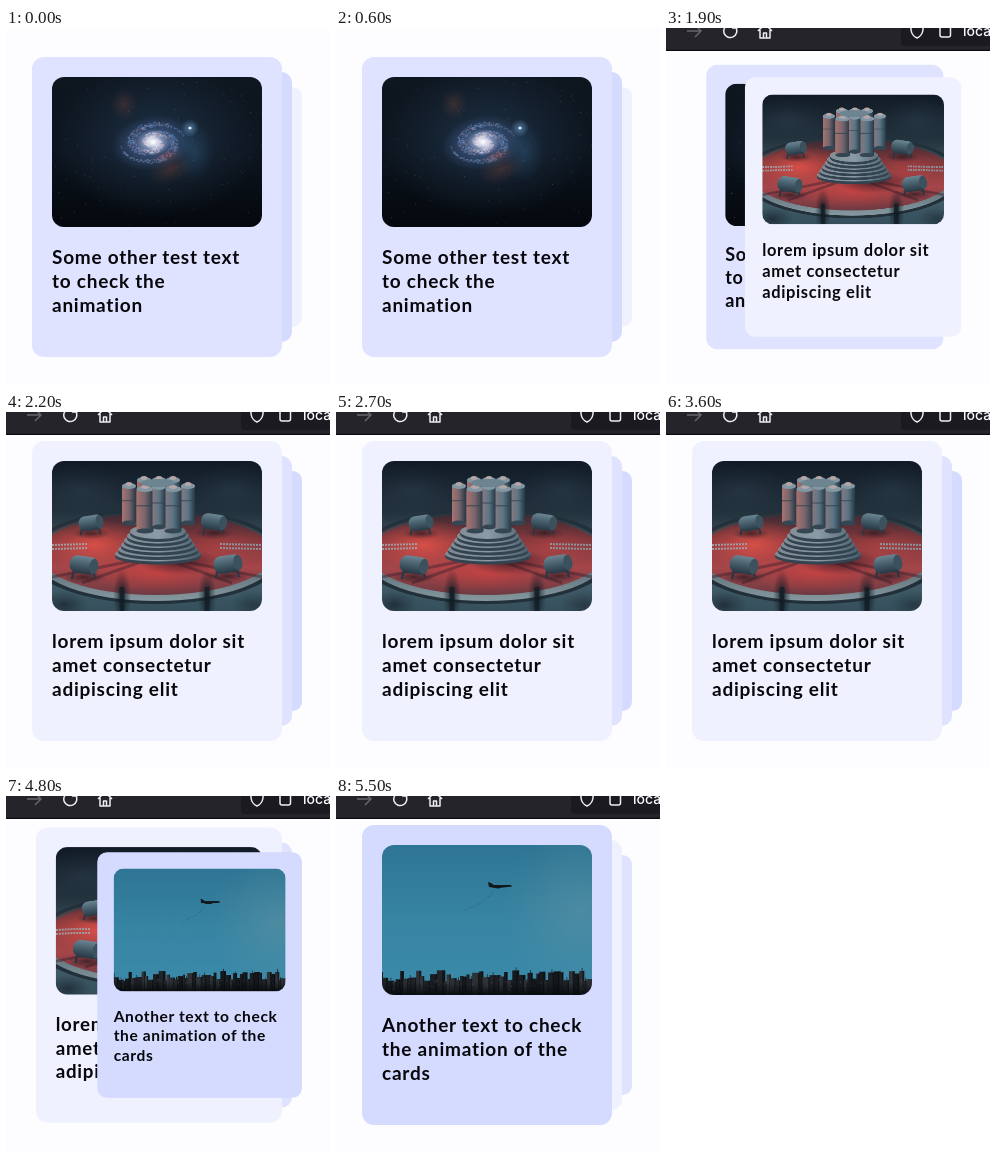
These frames come from a looping animation (324x356 px, 5600 ms). An HTML page with a canvas:

```html
<!DOCTYPE html>
<html lang="en">
<head>
<meta charset="utf-8">
<title>Card stack</title>
<style>
  html, body { margin: 0; width: 100%; height: 100%; overflow: hidden; background: #fdfdff; }
  .card {
    position: absolute; left: 26px; top: 29px; width: 250px; height: 300px;
    border-radius: 12px; transform-origin: 100% 50%;
  }
  .card canvas { position: absolute; left: 20px; top: 20px; width: 210px; height: 150px; border-radius: 12px; }
  .card p {
    position: absolute; left: 20px; top: 188px; margin: 0; white-space: nowrap;
    font: 700 19px/24px Lato, sans-serif; letter-spacing: .75px; color: #08080c;
  }
  #bar { position: absolute; left: 0; top: 0; z-index: 9; display: block; }
</style>
</head>
<body>
<div class="card" style="background:#e0e3ff"><canvas></canvas><p>Some other test text<br>to check the<br>animation</p></div>
<div class="card" style="background:#d5daff"><canvas></canvas><p>Another text to check<br>the animation of the<br>cards</p></div>
<div class="card" style="background:#f0f1ff"><canvas></canvas><p>lorem ipsum dolor sit<br>amet consectetur<br>adipiscing elit</p></div>
<svg id="bar" width="324" height="23" fill="none" stroke="#eeeef2" stroke-width="1.5" stroke-linejoin="round">
  <path d="M0 0H324V23H0Z" fill="#25242b" stroke="none"/>
  <path d="M0 22.5H324" stroke="#0c0c10"/>
  <path d="M235 0V14Q235 18 239 18H324V0Z" fill="#1b1a21" stroke="none"/>
  <path d="M21 3H35M29-3L35 3L29 9" stroke="#66656d"/>
  <path d="M70 0A6.5 6.5 0 1 1 62-3M66 0H71V-5"/>
  <path d="M92 3L99-4L106 3M94 2V10H104V2M97.5 10V5H100.5V10"/>
  <path d="M245-3V2Q246 8 251 10Q256 8 257 2V-3"/>
  <rect x="274" y="-6" width="10.5" height="15" rx="2"/>
  <text x="297" y="8" fill="#fbfbfe" stroke="none" font-family="Inter, sans-serif" font-size="14" font-weight="500">loca</text>
</svg>
<script>
const LOOP = 5600, SWAPS = [1748, 4725];
const TAU = Math.PI * 2;
const cards = [...document.querySelectorAll('.card')];
const bar = document.getElementById('bar');

function seeded(seed) {
  return () => (seed = (seed * 16807) % 2147483647) / 2147483647;
}

function painter(card) {
  const canvas = card.querySelector('canvas');
  canvas.width = 420;
  canvas.height = 300;
  const c = canvas.getContext('2d');
  c.scale(2, 2);
  const rect = (x, y, w, h, fill) => { c.fillStyle = fill; c.fillRect(x, y, w, h); };
  const oval = (x, y, rx, ry, fill) => {
    c.fillStyle = fill;
    c.beginPath();
    c.ellipse(x, y, rx, ry, 0, 0, TAU);
    c.fill();
  };
  const line = (width, color, ...pts) => {
    c.lineWidth = width;
    c.strokeStyle = color;
    c.beginPath();
    for (let i = 0; i < pts.length; i += 2) c.lineTo(pts[i], pts[i + 1]);
    c.stroke();
  };
  const fade = (x0, y0, x1, y1, ...colors) => {
    const g = c.createLinearGradient(x0, y0, x1, y1);
    colors.forEach((color, i) => g.addColorStop(i / (colors.length - 1), color));
    return g;
  };
  // Soft elliptical glow of an "r,g,b" colour
  const glow = (x, y, rx, ry, rgb, alpha, turn = 0) => {
    c.save();
    c.translate(x, y);
    c.rotate(turn);
    c.scale(rx, ry);
    const g = c.createRadialGradient(0, 0, 0, 0, 0, 1);
    g.addColorStop(0, `rgba(${rgb},${alpha})`);
    g.addColorStop(.5, `rgba(${rgb},${alpha * .45})`);
    g.addColorStop(1, `rgba(${rgb},0)`);
    oval(0, 0, 1, 1, g);
    c.restore();
  };
  return { c, rect, oval, line, fade, glow };
}

function paintGalaxy({ c, rect, oval, fade, glow }) {
  const rnd = seeded(71);
  rect(0, 0, 210, 150, fade(0, 0, 0, 150, '#0e161f', '#0d151f', '#05080d'));
  glow(105, 62, 105, 80, '38,62,88', .7);
  glow(72, 27, 14, 16, '110,66,56', .4);
  glow(119, 92, 24, 14, '120,66,54', .4, -.4);
  glow(142, 74, 20, 30, '48,92,125', .45);
  for (let i = 0; i < 110; i++) {
    oval(rnd() * 210, rnd() * 150, .35, .35, `rgba(205,218,235,${.1 + rnd() * .5})`);
  }
  glow(101, 66, 42, 27, '92,126,190', .75, -.15);
  c.save();
  c.translate(101, 66);
  c.rotate(-.12);
  for (let i = 0; i < 1100; i++) {
    const k = rnd(), r = 5 + 27 * k;
    const a = k * 5.5 + (i % 2) * Math.PI + (rnd() - .5) * 1.8;
    const rgb = rnd() < .2 ? '180,110,110' : k < .4 ? '205,205,230' : '120,155,210';
    oval(Math.cos(a) * r, Math.sin(a) * r * .65, .8, .6, `rgba(${rgb},${.15 + rnd() * .35})`);
  }
  c.restore();
  glow(115, 79, 17, 6, '165,80,75', .45, -.3);
  glow(101, 65, 18, 13, '235,230,250', .85);
  glow(101, 65, 9, 8, '255,255,255', 1);
  glow(138, 51, 9, 9, '120,175,225', .6);
  oval(138, 51, 1.5, 1.3, '#e4f2ff');
}

function paintMachine({ c, rect, oval, line, fade, glow }) {
  rect(0, 0, 210, 150, fade(0, 0, 0, 150, '#111b26', '#22313c', '#4a6672', '#35505c'));
  glow(30, 30, 50, 26, '50,70,84', .4);
  glow(180, 30, 45, 26, '50,72,86', .4);

  // Lit platter and its rim
  oval(104, 95, 128, 48, '#22303a');
  oval(104, 95, 122, 45, fade(0, 50, 0, 140, '#26323c', '#4d5f69', '#8799a0'));
  oval(104, 93, 117, 41, fade(0, 52, 0, 134, '#3b2a33', '#81383c', '#a5464a', '#6e3a42'));
  glow(42, 84, 58, 25, '235,84,74', .8);
  glow(104, 112, 70, 20, '215,66,64', .65);
  glow(168, 86, 45, 20, '200,70,70', .45);
  for (const x of [-30, 30, 180, 240]) line(3, 'rgba(58,32,42,.45)', 105, 95, x, 122);
  glow(128, 101, 42, 13, '50,24,34', .8);

  // Braided cables
  c.setLineDash([2, 1]);
  for (const y of [84, 88]) {
    line(2, '#a29ba2', 0, y, 36, y - 1);
    line(2, '#8d949c', 168, y - 1, 210, y);
  }
  c.setLineDash([]);

  const coil = (x, y, s, tilt) => {
    c.save();
    c.translate(x, y);
    c.scale(s, s);
    glow(0, 11, 20, 6, '35,24,32', .7);
    line(2, '#2a3742', -9, 4, -11, 13);
    line(2, '#2a3742', 8, 4, 10, 12);
    c.rotate(tilt);
    c.fillStyle = fade(0, -9, 0, 9, '#718b98', '#455d6a', '#24333f');
    c.beginPath();
    c.roundRect(-13, -8, 26, 16, 7);
    c.fill();
    oval(9, 0, 4, 7, '#3b515e');
    c.restore();
  };
  coil(39, 62, .95, -.15);
  coil(162, 61, 1, .15);
  coil(32, 104, 1.1, .15);
  coil(176, 103, 1.1, -.15);

  // Stepped base
  for (let i = 0; i < 6; i++) {
    const y = 93 - i * 4.5, rx = 43 - i * 3;
    oval(106, y + 2.5, rx, 8, '#33434f');
    oval(106, y, rx, 7.5, fade(62, 0, 150, 0, '#7e8790', '#8b9ca7', '#465a68'));
  }

  // Ring of cylinders, back to front, warm light from the left
  rect(79, 30, 56, 34, fade(79, 0, 134, 0, '#6d4c50', '#293c4a', '#334a58'));
  const tube = (x, y, w, h) => {
    const [edge, body] = x < 100 ? ['#a87370', '#79666d'] : ['#8a7880', '#5c7686'];
    rect(x - w / 2, y, w, h, fade(x - w / 2, 0, x + w / 2, 0, edge, body, '#263946'));
    oval(x, y + h, w / 2, 2.5, '#334652');
    oval(x, y, w / 2, 3, '#8197a3');
    oval(x, y - 2, w / 4, 2, '#b4a5a6');
    line(.8, '#2d414e', x - w / 2, y + h * .4, x + w / 2, y + h * .4);
  };
  for (const x of [92, 107, 121]) tube(x, 19, 14, 34);
  for (const x of [77, 136]) tube(x, 25, 14, 37);
  for (const x of [93, 121]) tube(x, 28, 17, 42);
  tube(107, 26, 13, 40);
  oval(106, 22, 17, 4, '#6d8491');

  // Out-of-focus foreground
  for (const x of [70, 155]) {
    glow(x, 136, 9, 28, '16,26,34', .95);
    rect(x - 2.5, 126, 5, 24, 'rgba(18,28,36,.7)');
  }
  glow(12, 144, 24, 14, '28,40,50', .8);
  glow(202, 144, 24, 14, '28,40,50', .6);
}

function paintCity({ c, rect, line, fade, glow }) {
  const rnd = seeded(29);
  rect(0, 0, 210, 150, fade(0, 0, 0, 150, '#2f7694', '#3784a3', '#3c8baa'));
  glow(200, 65, 80, 80, '105,150,162', .45);
  c.setLineDash([1, 2]);
  line(.7, 'rgba(25,60,78,.7)', 111, 47, 99, 58, 81, 66);
  c.setLineDash([]);
  c.fillStyle = '#12171d';
  c.beginPath();
  [106, 37, 109, 38, 112, 40, 129, 40, 130, 41.5, 121, 42.5, 116, 43.5, 107, 42]
    .forEach((v, i, pts) => i % 2 || c.lineTo(v, pts[i + 1]));
  c.fill();
  rect(0, 137, 210, 13, '#11161b');
  for (let x = -2; x < 210;) {
    const w = 3 + rnd() * 6, h = 13 + rnd() * 12, shade = 18 + rnd() * 36;
    rect(x, 150 - h, w, h, `rgb(${shade},${shade + 4},${shade + 8})`);
    rect(x + w * .65, 150 - h, w * .35, h, 'rgba(5,8,11,.6)');
    if (rnd() < .25) rect(x + w / 2, 147 - h, .7, 4, '#171c22');
    x += w * .8;
  }
  for (let i = 0; i < 110; i++) {
    rect(rnd() * 210, 134 + rnd() * 15, 1.2, 1, `rgba(135,145,150,${rnd() * .4})`);
  }
  rect(0, 138, 210, 12, fade(0, 138, 0, 150, 'rgba(8,11,14,0)', 'rgba(8,11,14,.9)'));
}

[paintGalaxy, paintCity, paintMachine].forEach((paint, i) => paint(painter(cards[i])));

const ease = k => (k = Math.min(1, Math.max(0, k)), k * k * (3 - 2 * k));
const mix = (a, b, k) => a + (b - a) * k;

function draw() {
  const t = performance.now() % LOOP;
  const turns = SWAPS.filter(start => t >= start).length;
  cards.forEach((card, i) => {
    const slot = (i + turns) % 3;
    const last = turns ? (slot + 2) % 3 : slot;
    // The card coming forward takes longer than those stepping back
    const p = turns ? ease((t - SWAPS[turns - 1]) / (slot ? 300 : 400)) : 1;
    const shift = 10 * mix(last, slot, p ** 3);
    const size = 1 - .1 * mix(last, slot, p);
    card.style.transform = `translateX(${shift}px) scale(${size})`;
    card.style.zIndex = 3 - slot;
  });
  bar.style.transform = `translateY(${-23 * (1 - ease((t - 950) / 250))}px)`;
  requestAnimationFrame(draw);
}
draw();
</script>
</body>
</html>
```
